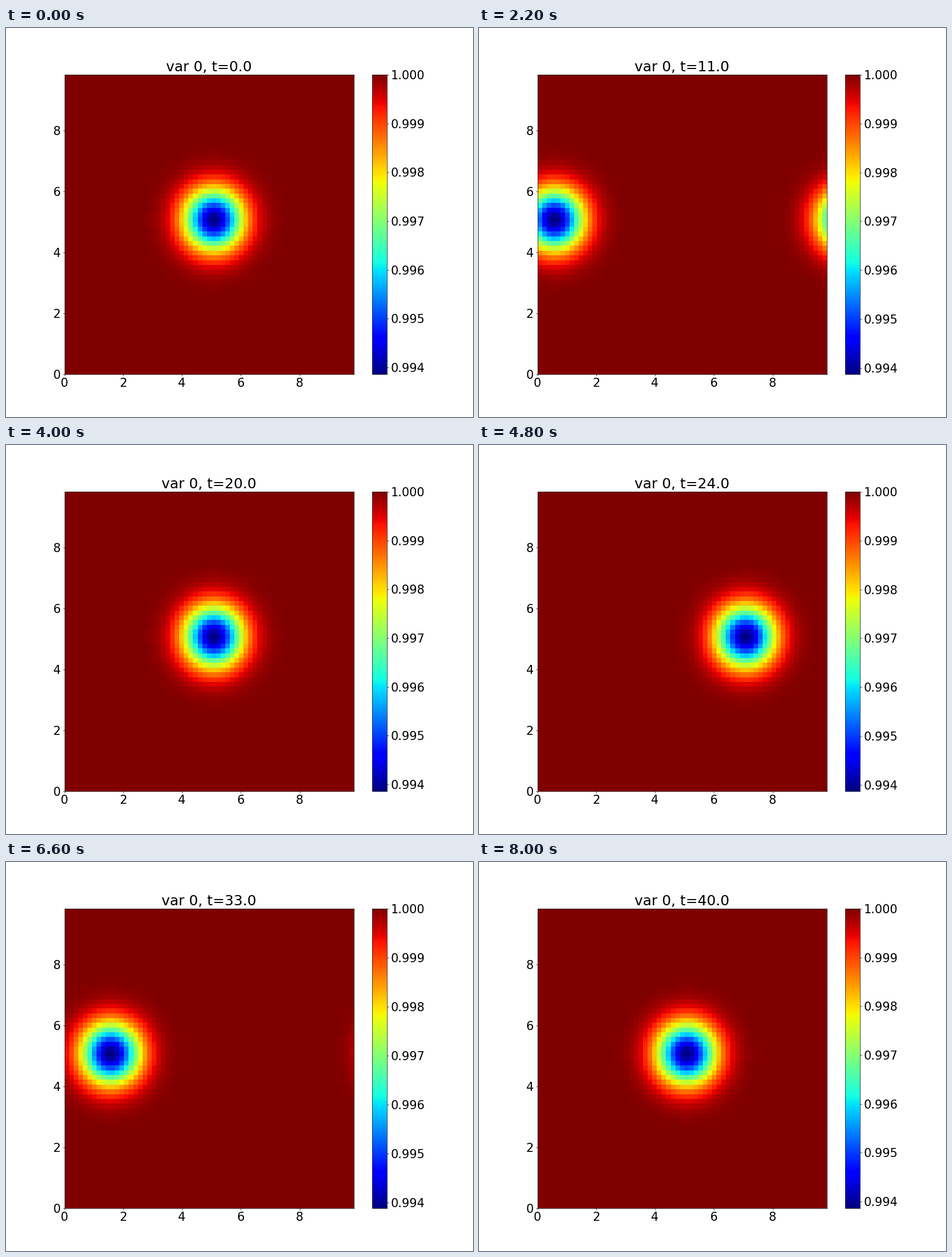
Write a matplotlib script that moves like this. It is 820 px wide and 683 px high and loops after 8200 ms.

```python
import numpy as np
import matplotlib.pyplot as plt
from matplotlib.animation import FuncAnimation

W, H, DPI = 820, 683, 64
FRAMES, STEP_MS = 41, 200
L, N = 10.0, 64              # periodic box and grid points per side
GAMMA, BETA, SPEED = 1.4, 0.5, 0.5

plt.rcParams.update({
    "font.family": "DejaVu Sans",
    "font.size": 23.5,
    "axes.titlepad": 6.4,
    "xtick.major.size": 3.7, "ytick.major.size": 3.7,
    "xtick.major.pad": 3.7, "ytick.major.pad": 3.7,
})

grid = np.arange(N) * L / N


def wrapped(d):
    """Shortest signed distance in the periodic box."""
    return (d + L / 2) % L - L / 2


def density(t):
    """Isentropic vortex carried along x."""
    dx = wrapped(grid - L / 2 - SPEED * t)
    dy = wrapped(grid - L / 2)
    r2 = dx[None, :] ** 2 + dy[:, None] ** 2
    dip = (GAMMA - 1) * BETA**2 / (8 * GAMMA * np.pi**2) * np.exp(1 - r2)
    return ((1 - dip) ** (1 / (GAMMA - 1)))[:-1, :-1]


fig, ax = plt.subplots(figsize=(W / DPI, H / DPI), dpi=DPI, facecolor="white")
mesh = ax.pcolormesh(grid, grid, density(0), cmap="jet", shading="flat")
ax.set_xticks(range(0, 10, 2))
ax.set_yticks(range(0, 10, 2))
title = ax.set_title("")
fig.colorbar(mesh, ax=ax, ticks=np.linspace(0.994, 1, 7), format="%.3f")


def update(i):
    rho = density(i)
    mesh.set_array(rho)
    mesh.set_clim(rho.min(), rho.max())
    title.set_text(f"var 0, t={i:.1f}")
    return mesh, title


anim = FuncAnimation(fig, update, frames=FRAMES, interval=STEP_MS,
                     repeat=True, repeat_delay=0, blit=False)
plt.show()
```
